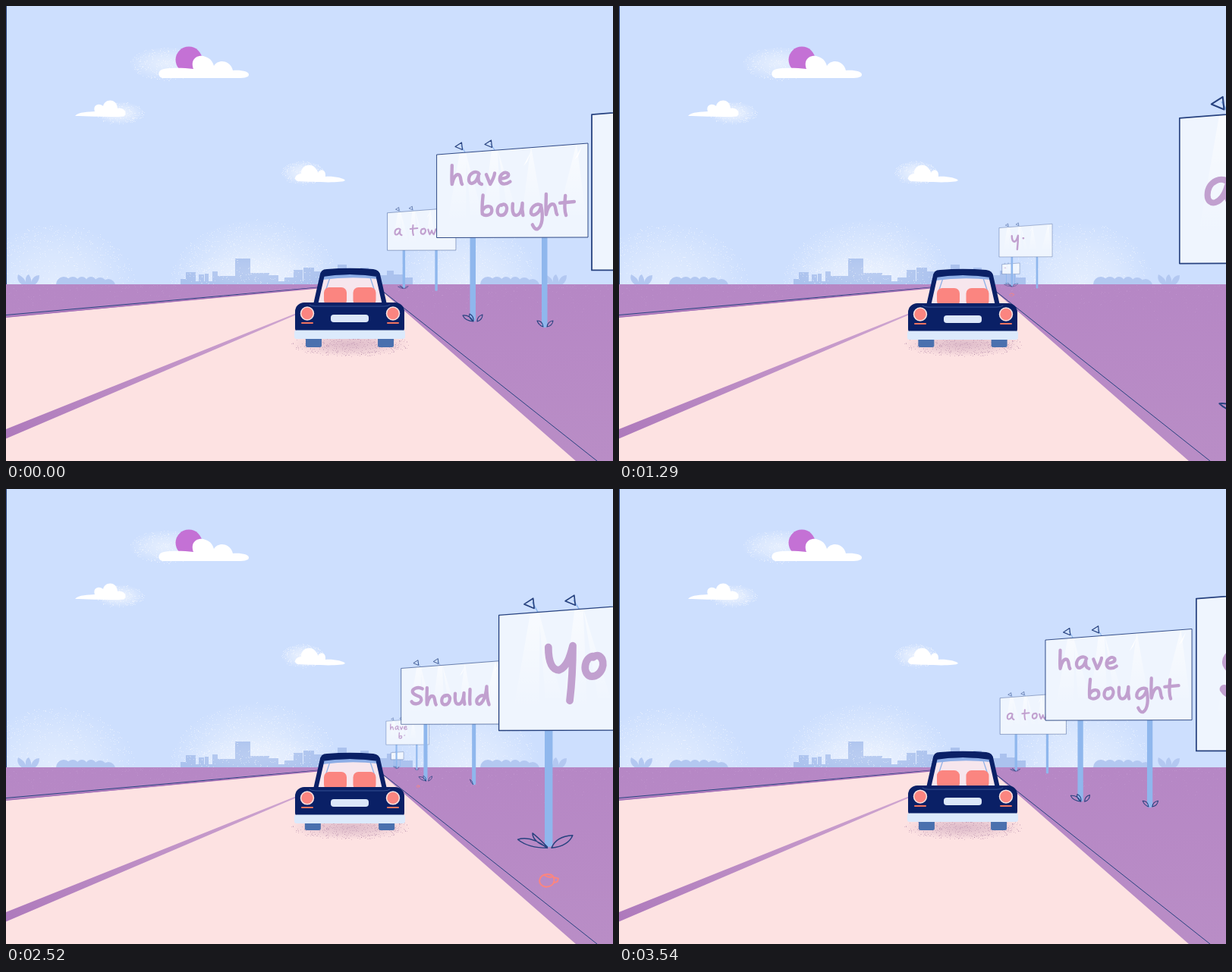
An HTML page with a canvas that plays this animation: 800 px wide and 600 px high, repeating every 3570 ms.

```html
<!DOCTYPE html>
<html lang="en">
<head>
<meta charset="utf-8">
<title>Roadside billboards</title>
<style>
html, body { margin: 0; width: 100%; height: 100%; overflow: hidden; background: #cddffe; }
canvas { display: block; width: 800px; height: 600px; }
</style>
</head>
<body>
<canvas id="stage" width="800" height="600" role="img" aria-label="you should have bought a towel"></canvas>
<script>
const LOOP = 3570, STEP = 30;
const NAVY = '#0a2066', LINE = '#27427f', POST = '#8fb7ed', SALMON = '#fb8580';
const stage = document.getElementById('stage').getContext('2d');
let c = stage;

// ---------- helpers ----------
function fill(color, path) {
  c.fillStyle = color;
  c.fill(new Path2D(path));
}
function line(color, width, path) {
  c.strokeStyle = color;
  c.lineWidth = width;
  c.stroke(new Path2D(path));
}
function oval(color, x, y, rx, ry = rx) {
  c.fillStyle = color;
  c.beginPath();
  c.ellipse(x, y, rx, ry, 0, 0, Math.PI * 2);
  c.fill();
}
function box(color, x, y, w, h, r = 0) {
  c.fillStyle = color;
  c.beginPath();
  c.roundRect(x, y, w, h, r);
  c.fill();
}
function ramp(x0, y0, x1, y1, from, to) {
  const g = c.createLinearGradient(x0, y0, x1, y1);
  g.addColorStop(0, from);
  g.addColorStop(1, to);
  return g;
}
let seed = 7;
function rnd() {
  seed = (seed * 16807) % 2147483647;
  return seed / 2147483647;
}
// Soft elliptical haze with a little grain.
function haze(rgb, x, y, rx, ry, alpha, dots) {
  c.save();
  c.translate(x, y);
  c.scale(rx, ry);
  const g = c.createRadialGradient(0, 0, 0, 0, 0, 1);
  g.addColorStop(0, `rgba(${rgb},${alpha})`);
  g.addColorStop(0.5, `rgba(${rgb},${alpha * 0.6})`);
  g.addColorStop(1, `rgba(${rgb},0)`);
  c.fillStyle = g;
  c.fillRect(-1, -1, 2, 2);
  c.restore();
  c.fillStyle = `rgba(${rgb},0.4)`;
  for (let i = 0; i < dots; i++) {
    const a = rnd() * Math.PI * 2, d = Math.sqrt(rnd());
    c.fillRect(Math.round(x + Math.cos(a) * d * rx), Math.round(y + Math.sin(a) * d * ry), 1, 1);
  }
}

// ---------- scenery ----------
function sky() {
  box('#cddffe', 0, 0, 800, 600);
  haze('255,255,255', 65, 367, 105, 80, 0.4, 900);
  haze('255,255,255', 328, 367, 112, 86, 0.55, 1400);
  haze('255,255,255', 610, 367, 95, 82, 0.45, 900);

  haze('255,255,255', 212, 76, 50, 22, 0.5, 300);
  oval('#c471d5', 241, 71, 17.5);
  fill('#fff', 'M206 95C199 93 200 84 208 83C222 81 235 82 247 83C242 69 254 63 263 67C270 69 273 75 274 79C278 71 293 70 298 82L299 85C309 84 321 86 320 91C319 96 306 95 290 95Z');
  haze('255,255,255', 150, 141, 32, 15, 0.6, 220);
  fill('#fff', 'M91 145C96 139 109 140 117 139C114 131 122 127 128 132C130 122 146 121 147 135C154 133 161 140 156 145C150 148 112 145 91 145Z');
  haze('255,255,255', 391, 220, 28, 16, 0.6, 200);
  fill('#fff', 'M385 231C378 229 381 222 389 221C388 211 401 206 407 213Q411 217 411 220C414 214 422 215 421 225C430 224 446 227 447 230C443 234 404 232 385 231Z');
}
function town() {
  const blue = '#abc2ee', leaf = '#b3c8f1';
  const blocks = [[230, 360, 10], [237, 351, 13], [254, 354, 7], [262, 353, 5], [272, 350, 7],
    [276, 356, 26], [302, 333, 20], [322, 352, 25], [346, 355, 13], [367, 358, 14], [379, 348, 12],
    [392, 345, 14], [406, 350, 12], [437, 341, 12], [449, 353, 18], [467, 345, 11], [478, 355, 24], [502, 349, 9], [511, 354, 12], [523, 358, 13]];
  for (const [x, y, w] of blocks) box(blue, x, y, w, 368 - y);
  box(blue, 230, 363, 306, 5);
  c.save();
  c.beginPath();
  c.rect(0, 340, 800, 27);
  c.clip();
  const hedge = [[76, 367, 10], [88, 365, 8], [100, 364, 7], [112, 364, 7], [124, 366, 8], [135, 369, 9]];
  for (const dx of [0, 559]) {
    for (const [x, y, r] of hedge) oval(leaf, x + dx, y, r);
  }
  for (const x of [30, 725]) {
    fill(leaf, `M${x - 8} 368Q${x - 17} 362 ${x - 14} 354Q${x - 6} 358 ${x - 4} 364Q${x - 5} 356 ${x} 354Q${x + 4} 360 ${x + 3} 364Q${x + 6} 355 ${x + 14} 355Q${x + 14} 364 ${x + 7} 368Z`);
  }
  c.restore();
  haze('255,255,255', 328, 352, 100, 26, 0.18, 300);
}
function ground() {
  box(ramp(0, 367, 0, 600, '#b687c5', '#b98dc6'), 0, 367, 800, 233);
  for (let i = 0; i < 700; i++) {
    box(`rgba(206,166,218,${rnd() * 0.4})`, Math.floor(rnd() * 800), Math.floor(368 + rnd() * rnd() * 55), 1, 1);
  }
  fill('#fde2e2', 'M0 411L415 371.5L432 367H485L751 600H0Z');
  line(LINE, 1, 'M0 407.5L412 371');
  line('#a572b7', 1.6, 'M0 410L415 371.5');
  line(LINE, 1, 'M485 367L779 600');
  fill(ramp(0, 560, 385, 405, '#ae7abc', '#cfa6d0'), 'M0 558L384 404.5V406.5L0 570.5Z');
  box(LINE, 0, 0, 1, 367);
  haze('175,130,165', 453, 446, 78, 16, 0.4, 500);
}
const scenery = document.createElement('canvas');
scenery.width = 800;
scenery.height = 600;
c = scenery.getContext('2d');
sky();
town();
ground();
c = stage;

// ---------- lettering ----------
const GLYPHS = {
  a: ['M16 -16C12 -22 0 -18 0 -7C0 2 11 1 15 -14C14 -7 15 -1 20 0'],
  b: ['M2 -32C1 -22 0 -10 1 -2C6 2 17 0 16 -9C15 -17 5 -15 2 -9'],
  d: ['M15 -14C8 -19 -2 -9 2 -2C8 3 16 -8 18 -31C18 -20 19 -8 22 0'],
  e: ['M1 -9C8 -8 16 -11 14 -16C10 -21 0 -16 1 -6C3 2 12 0 17 -4'],
  g: ['M15 -15C8 -19 0 -12 1 -4C4 2 13 -4 15 -14C18 0 17 14 10 18C6 19 4 14 3 12'],
  h: ['M1 -30C1 -20 0 -10 1 0C3 -10 7 -17 12 -15C16 -12 14 -4 17 0'],
  l: ['M1 -26C1 -16 0 -8 1 0'],
  o: ['M8 -16C0 -16 -2 -2 5 0C14 1 18 -12 12 -16C10 -17 8 -16 7 -15'],
  s: ['M21 -30C12 -35 0 -30 2 -23C6 -14 20 -18 19 -8C17 0 4 2 0 -5'],
  t: ['M8 -29C7 -20 6 -8 9 0', 'M0 -18L21 -20'],
  u: ['M1 -18C0 -8 1 0 6 0C12 0 15 -9 16 -19C15 -10 16 -4 17 0'],
  v: ['M0 -15L6 0C9 -5 12 -10 13 -17'],
  w: ['M0 -15C2 -8 3 -2 5 0C8 -4 10 -9 11 -12C12 -6 14 -2 17 0C20 -5 22 -10 23 -16'],
  y: ['M1 -17C1 -6 4 -2 8 -2C13 -4 15 -10 17 -18C17 -4 16 10 15 18']
};
const ruler = document.createElementNS('http://www.w3.org/2000/svg', 'path');
function lettering(glyphs) {
  const strokes = [];
  for (const [ch, x, y, size] of glyphs) {
    for (const d of GLYPHS[ch]) {
      ruler.setAttribute('d', d);
      strokes.push({ x, y, size, path: new Path2D(d), len: ruler.getTotalLength() });
    }
  }
  strokes.total = strokes.reduce((sum, s) => sum + s.len * s.size, 0);
  return strokes;
}
function write(strokes, pen, part) {
  let left = strokes.total * part;
  c.strokeStyle = '#c1a0cf';
  c.lineCap = c.lineJoin = 'round';
  for (const s of strokes) {
    if (left <= 0) break;
    c.save();
    c.translate(s.x, s.y);
    c.scale(s.size, s.size);
    c.lineWidth = pen / s.size;
    if (left < s.len * s.size) c.setLineDash([left / s.size, 999]);
    c.stroke(s.path);
    c.restore();
    left -= s.len * s.size;
  }
}

// ---------- billboards ----------
// Coordinates are relative to the lower left corner of the panel.
const LEAVES = {
  big: 'M46 112Q30 100 18 104Q28 112 46 112M46 111Q36 101 32 98Q32 106 46 111M50 112Q54 101 70 100Q66 110 50 112',
  mid: 'M46 112Q38 105 30 106Q36 112 46 112M45 110Q38 104 36 103Q38 109 45 110M49 112Q52 105 60 105Q58 111 49 112',
  small: 'M48 111Q37 110 34 103Q43 102 48 111M48 111Q41 106 43 101Q49 104 48 111M53 111Q53 104 60 102Q60 109 53 111',
  right: 'M140 118Q134 116 132 110Q139 110 140 118M145 118Q146 111 153 110Q152 117 145 118',
  stub: 'M140 118Q135 114 134 108Q140 112 140 118'
};
// "at" is when a panel reaches its reference size; "from"/"to" bound the writing.
const BOARDS = [
  { at: 2190, from: -1310, to: -340, pen: 7, leaves: ['big'], can: [47.5, 143, 1],
    text: lettering([['y', 45.5, -54, 1.45], ['o', 81, -51, 1.2], ['u', 113, -52, 1.4]]) },
  { at: 2880, from: -1620, to: -780, pen: 6.4, leaves: ['small', 'stub'], can: [33, 122, 0.35],
    text: lettering([['s', 20, -39, 1], ['h', 49, -38, 1.1], ['o', 78, -38, 1.12],
      ['u', 104, -39, 1.15], ['l', 133, -39, 1.12], ['d', 146, -38, 1.15]]) },
  { at: 0, from: -1800, to: -200, pen: 4.4, leaves: ['small', 'right'],
    text: lettering([['h', 19, -70, 0.83], ['a', 42, -70, 0.85], ['v', 65, -70, 0.85], ['e', 82, -70, 0.85],
      ['b', 59, -29, 0.83], ['o', 79, -29, 0.88], ['u', 99, -29, 0.85], ['g', 123, -28, 0.95],
      ['h', 143, -30, 0.9], ['t', 162, -29, 0.9]]) },
  { at: 690, from: -1750, to: -900, pen: 4.6, leaves: ['mid'],
    text: lettering([['a', 21, -44, 1], ['t', 66, -44, 1], ['o', 96, -47, 0.97],
      ['w', 118, -46, 0.97], ['e', 149, -46, 0.9], ['l', 174, -44, 1]]) }
];
// time, left, bottom, scale
const TRACK = [
  [-2070, 515, 362, 0.02], [-1950, 511, 361, 0.045], [-1860, 510.5, 360, 0.053], [-1710, 507, 356, 0.09],
  [-1440, 503, 350, 0.15], [-1260, 501, 345, 0.206], [-1170, 501, 342, 0.231], [-690, 503, 322, 0.452],
  [-480, 512, 314, 0.585], [-210, 536, 306, 0.797], [0, 568, 305, 1], [240, 624, 313, 1.275],
  [480, 697, 328, 1.587], [690, 772, 347.5, 1.876], [800, 816, 359, 2.03]
];
function slope(i, k) {
  const a = TRACK[Math.max(i - 1, 0)], b = TRACK[Math.min(i + 1, TRACK.length - 1)];
  return (b[k] - a[k]) / (b[0] - a[0]);
}
// Smooth curve through the track points.
function place(u) {
  const i = TRACK.findIndex((p, n) => n > 0 && u <= p[0]) - 1;
  const a = TRACK[i], b = TRACK[i + 1], d = b[0] - a[0], p = (u - a[0]) / d;
  const q = p * p, r = q * p;
  return [1, 2, 3].map(k => a[k] * (2 * r - 3 * q + 1) + b[k] * (3 * q - 2 * r) +
    d * (slope(i, k) * (r - 2 * q + p) + slope(i + 1, k) * (r - q)));
}
const PANEL = 'M0 -109L199 -124V0L0 0.5Z';
function board(b, u) {
  const [x, y, s] = place(u);
  c.save();
  c.translate(x, y);
  c.scale(s, s);
  c.lineJoin = c.lineCap = 'round';
  box(POST, 43.5, -2, 7.5, 113, 3);
  box(POST, 138, -2, 7.5, 121, 3);
  for (const name of b.leaves) line(LINE, 1.1, LEAVES[name]);
  if (b.can) {
    const [cx, cy, k] = b.can;
    c.save();
    c.translate(cx, cy);
    c.scale(k, k);
    line(SALMON, 1.4 / Math.sqrt(k), 'M-9 0Q-8 -6 -1 -6Q5 -6 5 0Q4 6 -3 6Q-9 5 -9 0M5 -3L9 -2L8 1L5 2M-4 -5Q0 -2 4 -4');
    c.restore();
  }
  line(POST, 1.2, 'M32 -121L37 -112M71 -123L76 -115');
  line(LINE, 1.2, 'M24 -119.5L32.5 -125L33.5 -115.5ZM63 -122.5L71.5 -128L72.5 -118.5Z');
  fill('#eff5fe', PANEL);
  c.save();
  c.clip(new Path2D(PANEL));
  const shine = ramp(0, -115, 0, -20, 'rgba(255,255,255,.6)', 'rgba(255,255,255,0)');
  fill(shine, 'M30 -112L14 -20H38L39 -112ZM38 -112L44 -30H60ZM72 -116L60 -20H84L80 -116ZM80 -116L94 -30H106ZM124 -120L112 -30H140ZM184 -124L160 -30H196Z');
  fill('#fff', 'M124 -113L114 -94L119 -100ZM191 -120L181 -102L186 -107Z');
  c.restore();
  const part = Math.min(1, Math.max(0, (u - b.from) / (b.to - b.from)));
  write(b.text, b.pen, part);
  line(LINE, Math.max(0.95, 0.3 / s), PANEL);
  c.restore();
}
function billboards(t) {
  BOARDS.map(b => ({ b, u: (t - b.at + 2070 + LOOP * 2) % LOOP - 2070 }))
    .filter(o => o.u < 800)
    .sort((m, n) => m.u - n.u)
    .forEach(o => board(o.b, o.u));
}

// ---------- cars ----------
function wheel(x, y, r) {
  oval(NAVY, x, y, r, r * 1.1);
  oval('#dce8fa', x + 1, y, r * 0.6, r * 0.66);
  oval('#42609d', x + 1, y, r * 0.45, r * 0.5);
}
function oncoming(t) {
  const k = Math.exp((t - 480) / 130);
  if (k < 0.06 || k > 9) return;
  c.save();
  c.translate(440, 367);
  c.scale(k, k);
  c.translate(-440, -367);
  haze('175,130,165', 326, 402, 58, 8, 0.4, 0);
  box(NAVY, 282, 399, 18, 8, 3);
  fill('#5ba378', 'M274 400C272 388 275 378 284 375L295 372C297 356 302 347 316 347H340C353 348 361 358 364 369C374 371 380 378 378 389L360 397L343 402Z');
  fill('#e4eef8', 'M298 371C300 361 303 356 310 355H332C341 356 346 363 348 371Z');
  oval('#6c5a66', 316, 367, 9, 5.5);
  oval('#6c5a66', 339, 366, 8, 5.5);
  fill('#5ba378', 'M294 370H352V374H294ZM329 354H333L336 371H332Z');
  line('#3b7a58', 1, 'M278 377Q305 372 341 374M343 401Q339 384 347 375');
  box('#f7f9fa', 288, 380, 38, 14.5, 4);
  line('#a9bccb', 1, 'M290 384H324M290 388H324M290 391.5H324');
  oval('#f4fbf5', 281, 386, 4.5);
  oval('#f4fbf5', 333, 385, 4.5);
  oval('#fb9b8d', 278, 394, 2, 1.5);
  box('#dff0f5', 273, 397, 71, 6, 3);
  wheel(351, 396, 9);
  wheel(370, 391, 7.5);
  c.restore();
}
function ownCar(t) {
  const dip = 2.1 - 2.1 * Math.cos(t / LOOP * 6 * Math.PI * 2), spread = dip * 0.6;
  box('#4a70ae', 395 - spread, 434, 21, 16, 2.5);
  box('#4a70ae', 490 + spread, 434, 21, 16, 2.5);
  c.save();
  c.translate(0, dip);
  c.lineCap = 'round';
  fill('#f7e6ed', 'M410 393L420 354H487L497 393Z');
  line('#8fb0e6', 1.3, 'M427 358L421 376M480 358L486 376');
  box(SALMON, 419, 371, 30, 24, 7);
  box(SALMON, 457.5, 371, 30, 24, 7);
  fill('#8eaee6', 'M419 354H488L490 360Q453 356 417 361Z');
  c.lineJoin = 'round';
  line(NAVY, 6, 'M408 394L417 354Q453 348 490 354L499 394');
  fill(NAVY, 'M414 356Q414 347 423 347Q453 344.5 484 347Q493 348 493 356Q453 352 414 356Z');
  box(NAVY, 381, 391, 144, 38, [12, 12, 4, 4]);
  line('#3f5da0', 0.8, 'M400 394Q402 396 408 396H498Q504 396 506 394');
  for (const x of [397, 510]) {
    oval('#fbe3e2', x, 405.5, 9.2);
    oval(SALMON, x, 405.5, 7.7);
    line('#f0745f', 2, `M${x - 7} 418H${x + 7}`);
  }
  box('#dbe7fa', 428, 407, 50, 10, 4);
  box('#dceafc', 380, 427.5, 146, 11.5, 3);
  c.restore();
}

function draw(now) {
  const t = Math.floor((now % LOOP) / STEP) * STEP;
  c.drawImage(scenery, 0, 0);
  billboards(t);
  oncoming(t);
  ownCar(t);
}
const start = performance.now();
function tick() {
  draw(performance.now() - start);
  requestAnimationFrame(tick);
}
tick();
</script>
</body>
</html>
```
